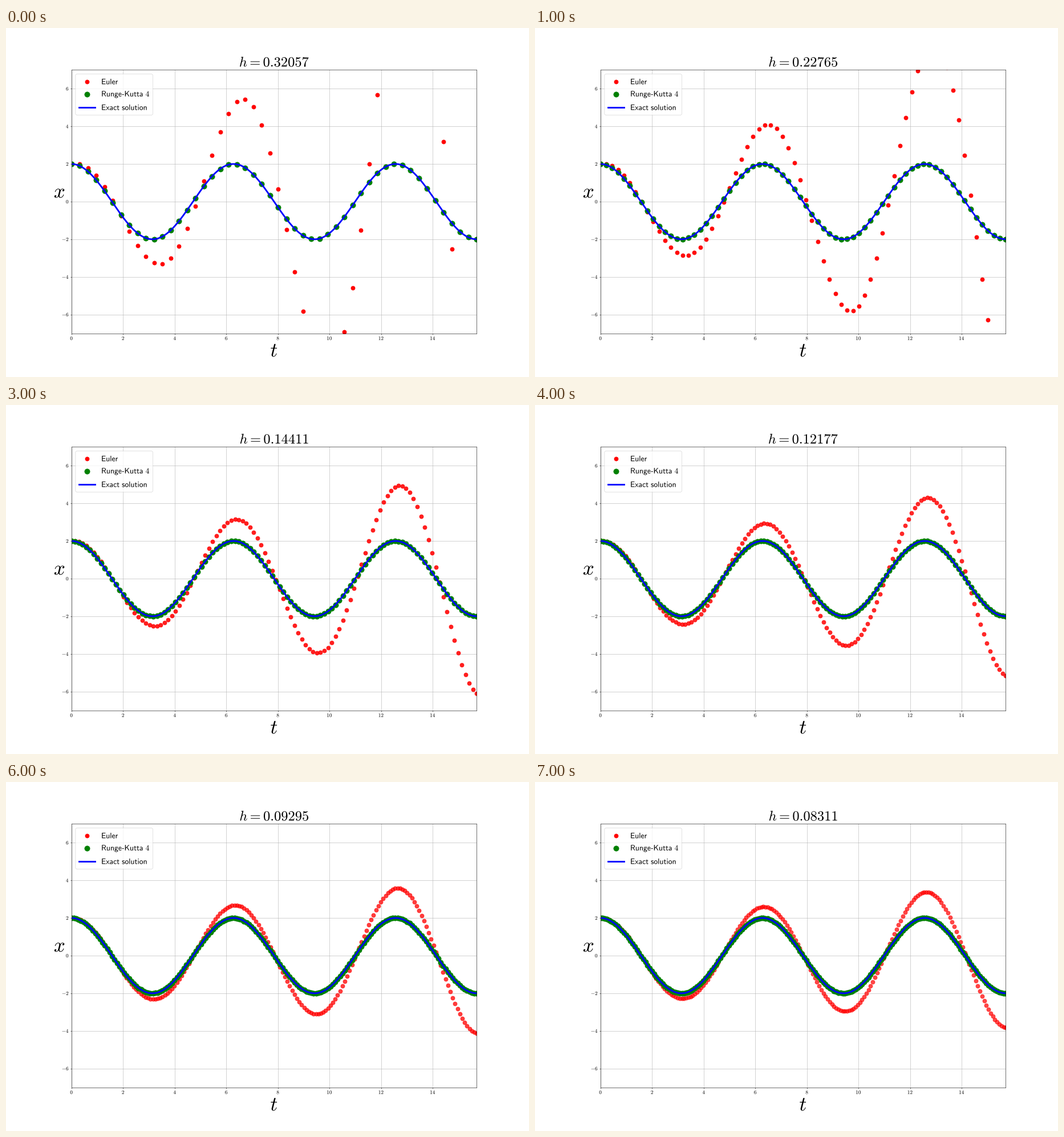
Write a matplotlib script that moves like this. It is 917 by 611 pixels and loops after 8000 ms.

```python
import numpy as np
import matplotlib.pyplot as plt
from matplotlib.animation import FuncAnimation
from matplotlib.lines import Line2D
from matplotlib.patches import FancyBboxPatch, PathPatch
from matplotlib.textpath import TextPath
from matplotlib.transforms import Affine2D, IdentityTransform

# At 72 dpi one point is one pixel.
W, H, DPI = 917, 611, 72
T_END = 5 * np.pi
AMPLITUDE = 2
PT = W / 18 / 72  # scale of the 18-inch-wide layout

plt.rcParams["mathtext.fontset"] = "cm"

fig = plt.figure(figsize=(W / DPI, H / DPI), dpi=DPI, facecolor="white")
ax = fig.add_axes([0.125, 0.125, 0.775, 0.755])
ax.set_xlim(0, T_END)
ax.set_ylim(-7, 7)
ax.set_xticks(range(0, 15, 2))
ax.set_yticks(range(-6, 7, 2))
ax.tick_params(length=3.5 * PT, width=0.8 * PT, labelbottom=False, labelleft=False)
ax.grid(color="#b0b0b0", linewidth=0.8 * PT)
for spine in ax.spines.values():
    spine.set_linewidth(0.8 * PT)


def text_path(tex, x, y, size, align="left"):
    """Outline of a formula with its baseline y pixels below the top."""
    path = TextPath((0, 0), tex, size=size)
    box = path.get_extents()
    shift = {"left": 0, "center": (box.x0 + box.x1) / 2, "right": box.x1}[align]
    return path.transformed(Affine2D().translate(x - shift, H - y))


def put_text(*args, **kwargs):
    patch = PathPatch(text_path(*args, **kwargs), facecolor="black", linewidth=0,
                      transform=IdentityTransform(), zorder=10)
    return fig.add_artist(patch)


def title_path(step):
    return text_path(r"$h=\mathrm{%.5f}$" % step, 470.3, 67.6, 24.5, "center")


# Axis texts
for t in ax.get_xticks():
    x = ax.transData.transform((t, 0))[0]
    put_text(r"$\mathrm{%d}$" % t, x, 546.2, 13 * PT, align="center")
for v in ax.get_yticks():
    y = H - ax.transData.transform((0, v))[1]
    sign = "-" if v < 0 else ""
    put_text(r"$%s\mathrm{%d}$" % (sign, abs(v)), 109.2, y + 3.1, 13 * PT, align="right")
put_text("$t$", 469.7, 575.3, 50 * PT, align="center")
put_text("$x$", 93.6, 297.2, 50 * PT, align="center")
title = put_text("$h$", 470, 67.6, 24.5)

# Curves
EULER = dict(color="red", marker="o", linestyle="none",
             markersize=10 * PT, markeredgewidth=PT)
RUNGE = dict(color="green", marker="o", linestyle="none",
             markersize=13 * PT, markeredgewidth=PT)
EXACT = dict(color="blue", linewidth=4 * PT, solid_capstyle="projecting")

euler, = ax.plot([], [], **EULER)
runge, = ax.plot([], [], **RUNGE)
fine = np.linspace(0, T_END, 600)
ax.plot(fine, AMPLITUDE * np.cos(fine), **EXACT)

# Legend
fig.add_artist(FancyBboxPatch(
    (121.9, H - 152.4), 135.6, 71.8, boxstyle="round,pad=0,rounding_size=2.8",
    facecolor="white", edgecolor="0.8", alpha=0.8, linewidth=PT,
    transform=IdentityTransform(), zorder=5))
rows = [
    (EULER, [141.9], 94.0, 98.5, r"$\mathsf{Euler}$"),
    (RUNGE, [141.9], 115.7, 119.8,
     "$\\mathsf{Runge}\\mathrm{\u2010}\\mathsf{Kutta\\ 4}$"),
    (EXACT, [128.0, 156.3], 138.9, 143.6, r"$\mathsf{Exact\ solution}$"),
]
for style, xs, y, baseline, tex in rows:
    fig.add_artist(Line2D(xs, [H - y] * len(xs), transform=IdentityTransform(),
                          zorder=6, **style))
    put_text(tex, 167, baseline, 13.7)


def update(i):
    count = 50 + 20 * i
    h = T_END / (count - 1)
    n = np.arange(count)
    z = 1j * h
    # Each method multiplies the complex state by a fixed factor per step.
    euler_gain = 1 + z
    runge_gain = 1 + z + z**2 / 2 + z**3 / 6 + z**4 / 24
    euler.set_data(n * h, AMPLITUDE * (euler_gain**n).real)
    runge.set_data(n * h, AMPLITUDE * (runge_gain**n).real)
    euler.set_alpha(1 - 0.04 * i)
    title.set_path(title_path(h))
    return euler, runge, title


anim = FuncAnimation(fig, update, frames=8, interval=1000, repeat=True,
                     repeat_delay=0, blit=False)
plt.show()
```
